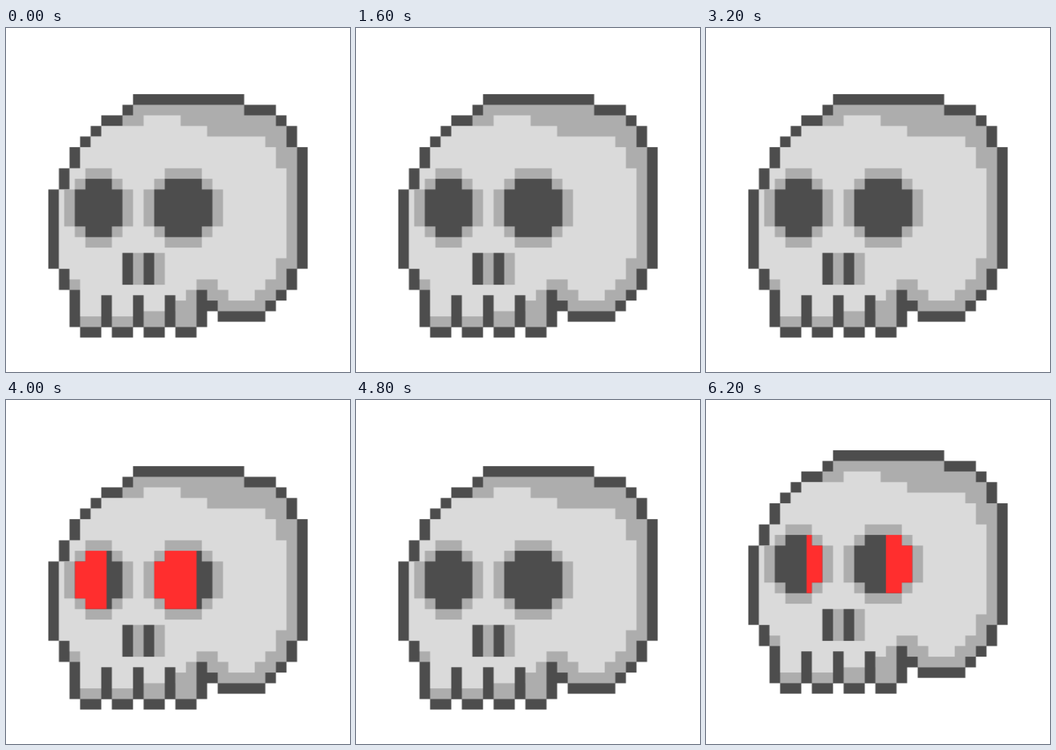
Animation of 500 by 500 pixels, one loop 6.41 s. Source, as an HTML page without scripts:

```html
<!DOCTYPE html>
<html lang="en">
<head>
<meta charset="utf-8">
<title>Skull</title>
<style>
  :root { --cycle: 1602.5ms; --dark: #4d4d4d; --shade: #adadad; --light: #dadada; }
  html, body { margin: 0; width: 100%; height: 100%; overflow: hidden; background: #fff; }
  svg { display: block; width: 100%; height: 100%; }
  .dark { fill: var(--dark); }
  .shade { fill: var(--shade); }
  .light { fill: var(--light); }
  .row { fill: none; stroke: var(--dark); }

  /* two bobs and one glow per cycle; the short lead keeps steps on the 200 ms beat */
  .skull { animation: bob calc(var(--cycle) / 2) -10ms step-end infinite; }
  .glow { fill: #ff2e2e; animation: sweep var(--cycle) -10ms step-end infinite; }
  .left { --ahead: calc(100% * 3 / 9); --behind: calc(100% * 6 / 9); }
  .right { --ahead: calc(100% * 3 / 11); --behind: calc(100% * 6 / 11); }

  @keyframes bob {
    0% { transform: none; }
    25%, 75% { transform: translateY(-3px); }
    50% { transform: translateY(-6px); }
  }
  @keyframes sweep {
    0% { clip-path: inset(0 100% 0 0); }
    50% { clip-path: inset(0 var(--ahead) 0 0); }
    62.5% { clip-path: inset(0 0 0 0); }
    87.5% { clip-path: inset(0 0 0 var(--behind)); }
  }
</style>
</head>
<body>
<svg viewBox="0 -.5 65 65">
  <defs>
    <path id="eyeL" d="M15 28h5v2h2v7h-2v2h-5v-2h-2v-7h2z"/>
    <path id="eyeR" d="M30 28h7v2h2v7h-2v2h-7v-2h-2v-7h2z"/>
  </defs>
  <g class="skull">
    <!-- head: outline, shaded inside, lit face -->
    <path class="dark" d="M24 12H45v2h6v2h2v2h2v4h2V45h-2v4h-2v2h-2v2h-2v2H40v-2H38v3H12V49h-2v-4H8V30h2v-4h2v-4h2v-2h2v-2h2v-2h4v-2h2z"/>
    <path class="shade" d="M24 14H45v2h6v2h2v4h2V45h-2v4h-2v2h-2v2H40v-2h-2v-2h-2v7H14V49h-2v-4h-2V30h2v-4h2v-4h2v-2h2v-2h4v-2h2z"/>
    <path class="light" d="M26 16h7v2h5v2H49v2h2v4h2V43h-2v4h-2v2h-2v2h-5v-2h-2v-2h-4v2h-2v2h-2v2h-7v1H14V47h-2v-2h-2V30h2v-4h2v-4h2v-2h2v-2h8z"/>

    <!-- teeth: lower edge, then gaps -->
    <path class="row" stroke-width="2" stroke-dasharray="4 2" d="M14 57h22"/>
    <path class="row" stroke-width="6" stroke-dasharray="2 4" d="M18 53h14"/>

    <!-- nose -->
    <path class="shade" d="M22 42h8v6h-8z"/>
    <path class="row" stroke-width="6" stroke-dasharray="2" d="M22 45h8"/>

    <!-- eyes -->
    <path class="shade" d="M15 26h5v2h2v2h2v7h-2v2h-2v2h-5v-2h-2v-2h-2v-7h2v-2h2z"/>
    <path class="shade" d="M30 26h7v2h2v2h2v7h-2v2h-2v2h-7v-2h-2v-2h-2v-7h2v-2h2z"/>
    <use class="dark" href="#eyeL"/>
    <use class="dark" href="#eyeR"/>
    <use class="glow left" href="#eyeL"/>
    <use class="glow right" href="#eyeR"/>
  </g>
</svg>
</body>
</html>
```
